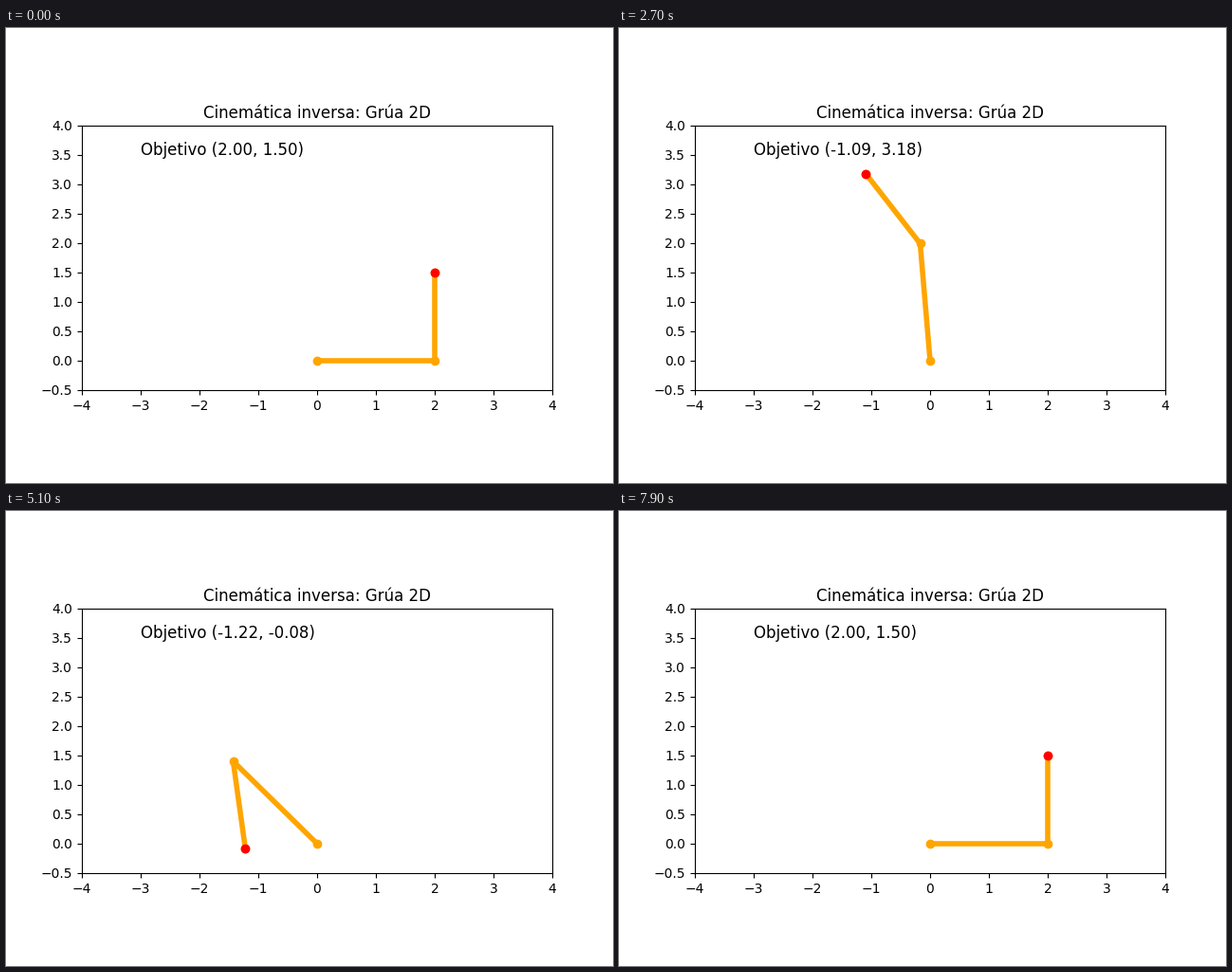
Write a matplotlib script that moves like this. It is 640 px wide and 480 px high and loops after 8 s.

```python
import numpy as np
import matplotlib.pyplot as plt
from matplotlib.animation import FuncAnimation

UPPER, FORE = 2.0, 1.5  # arm segment lengths
FRAMES = 80

angles = np.linspace(0, 2 * np.pi, FRAMES)
targets_x = 2 * np.cos(angles)
targets_y = 1.5 + 2 * np.sin(angles)


def solve_arm(x, y):
    """Return the points of base, elbow and tip that reach (x, y)."""
    cos_elbow = (x**2 + y**2 - UPPER**2 - FORE**2) / (2 * UPPER * FORE)
    elbow = np.arccos(np.clip(cos_elbow, -1, 1))
    shoulder = np.arctan2(y, x) - np.arctan2(
        FORE * np.sin(elbow), UPPER + FORE * np.cos(elbow))
    ex, ey = UPPER * np.cos(shoulder), UPPER * np.sin(shoulder)
    tip_x = ex + FORE * np.cos(shoulder + elbow)
    tip_y = ey + FORE * np.sin(shoulder + elbow)
    return [0, ex, tip_x], [0, ey, tip_y]


fig, ax = plt.subplots(figsize=(6.4, 4.8), dpi=100)
ax.set_xlim(-4, 4)
ax.set_ylim(-0.5, 4)
ax.set_aspect("equal")
ax.set_title("Cinemática inversa: Grúa 2D")

arm, = ax.plot([], [], "o-", lw=4, color="orange")
target, = ax.plot([], [], "ro")
label = ax.text(-3, 3.5, "", fontsize=12)


def update(i):
    x, y = targets_x[i], targets_y[i]
    arm.set_data(*solve_arm(x, y))
    target.set_data([x], [y])
    label.set_text(f"Objetivo ({x:.2f}, {y:.2f})")
    return arm, target, label


anim = FuncAnimation(fig, update, frames=FRAMES, interval=100,
                     repeat=True, repeat_delay=0)
plt.show()
```
